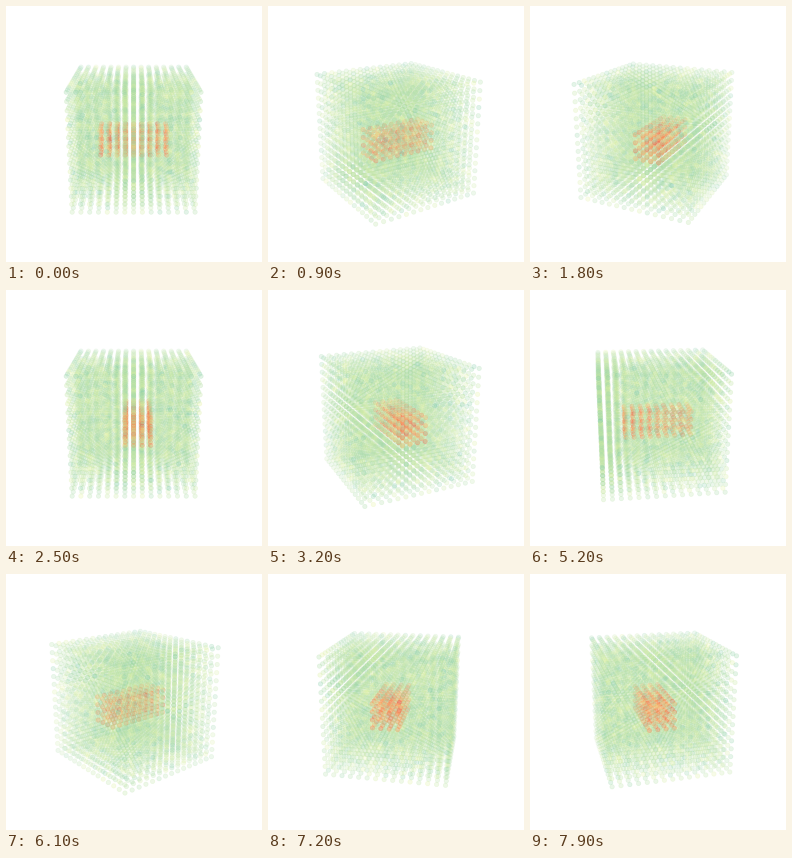
Recreate the animation shown at these times as a matplotlib script. Size 256 px wide and 256 px high, loop 8000 ms.

```python
import numpy as np
import matplotlib.pyplot as plt
from matplotlib.animation import FuncAnimation

SIZE, DPI = 256, 100
FRAMES, INTERVAL = 80, 100
TURN = np.radians(3.6)          # rotation per frame
ELEV = np.radians(19)
DIST, FOCAL = 8.0, 453.5        # camera, in half cube sides and pixels
CENTER = np.array([127.6, 128.0])
N = 15

# Cubic lattice: x to the right, y towards the viewer, z up
half = N // 2
cells = np.arange(N) - half
ix, iy, iz = (g.ravel() for g in np.meshgrid(cells, cells, cells, indexing="ij"))
x, y, z = ix / half, iy / half, iz / half
core = (abs(ix) <= 4) & (iy >= -1) & (iy <= 2) & (iz >= -2) & (iz <= 1)

# Noisy field with a hot block inside
rng = np.random.default_rng(4)
noise = rng.normal(0, 1, N ** 3)
value = np.where(core, 0.755 + 0.035 * noise, 0.318 + 0.035 * noise)
colors = plt.get_cmap("Spectral_r")(np.clip(value, 0.2, 0.86))
opacity = np.where(core, 0.5, 0.29)


def project(angle):
    """Screen positions and depths of the turned lattice."""
    c, s = np.cos(angle), np.sin(angle)
    u, v = x * c + y * s, y * c - x * s
    ce, se = np.cos(ELEV), np.sin(ELEV)
    depth = DIST - v * ce - z * se
    pos = np.column_stack((u, z * ce - v * se)) * (FOCAL / depth)[:, None]
    return pos + CENTER, depth


fig = plt.figure(figsize=(SIZE / DPI, SIZE / DPI), dpi=DPI, facecolor="white")
ax = fig.add_axes([0, 0, 1, 1])
ax.set(xlim=(0, SIZE), ylim=(0, SIZE))
ax.axis("off")
px = 72 / DPI
dots = ax.scatter(x, y, s=(4.4 * px) ** 2, c=colors, linewidths=0.6 * px)


def update(frame):
    pos, depth = project(frame * TURN)
    order = np.argsort(-depth, kind="stable")
    near = (depth.max() - depth) / np.ptp(depth)
    rgba = colors.copy()
    rgba[:, 3] = opacity * (0.4 + 0.6 * near)
    rgba = rgba[order]
    dots.set_offsets(pos[order])
    dots.set_facecolors(rgba)
    dots.set_edgecolors(rgba)
    return (dots,)


anim = FuncAnimation(fig, update, frames=FRAMES, interval=INTERVAL,
                     repeat=True, repeat_delay=0)
plt.show()
```
